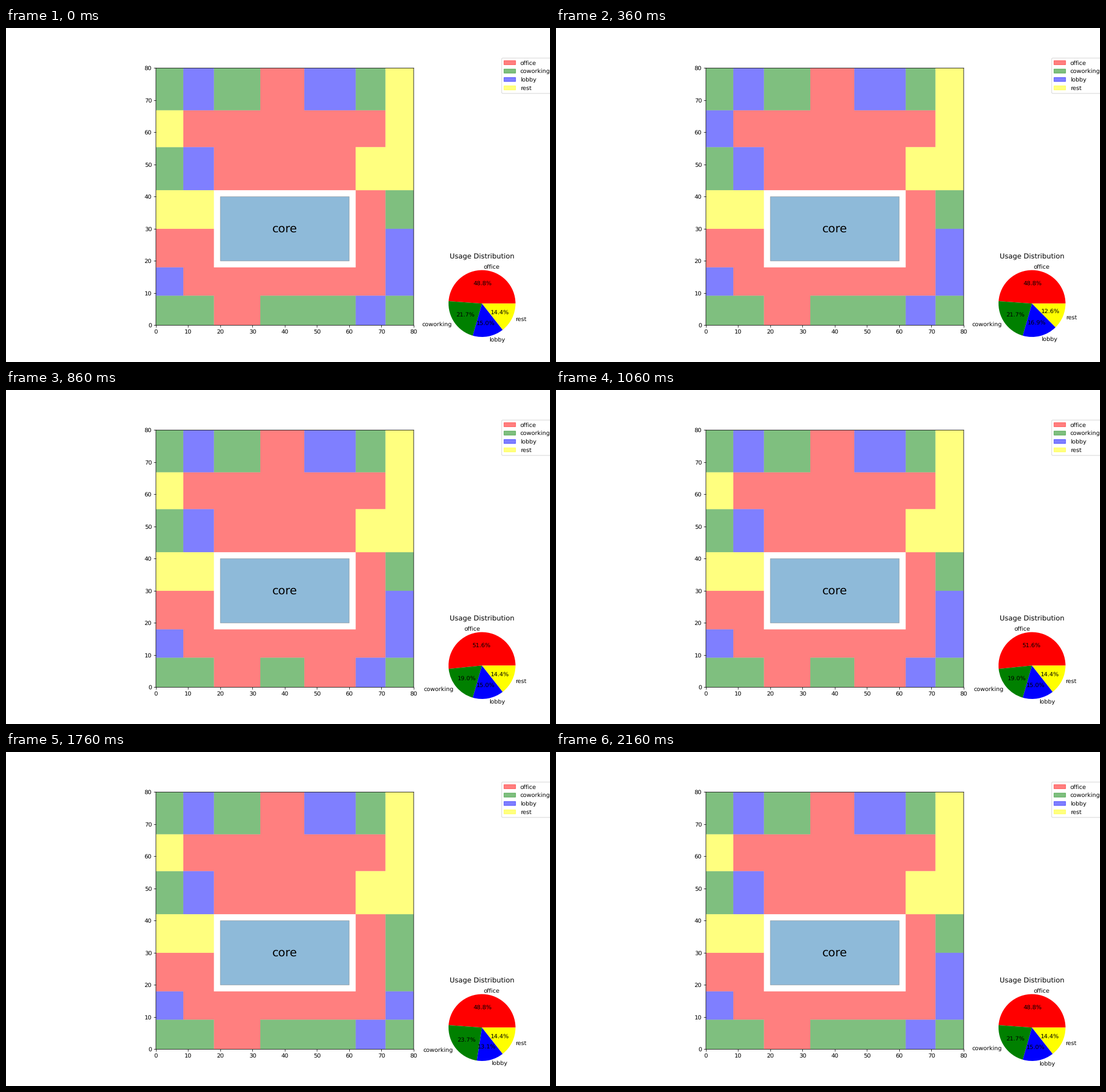
Animation, 954 px wide and 587 px high, one loop 2.26 s. Source, as a matplotlib script:

```python
import matplotlib.pyplot as plt
from matplotlib.animation import FuncAnimation
from matplotlib.patches import Patch, PathPatch, Rectangle
from matplotlib.path import Path

TICK = 20
LOOP = 2260

KINDS = {
    "O": ("office", "red"),
    "C": ("coworking", "green"),
    "L": ("lobby", "blue"),
    "R": ("rest", "yellow"),
}
XS = [0, 8.5, 18, 32.4, 46.05, 62, 71.25, 80]
YS = [80, 66.85, 55.4, 42, 30, 18, 9.2, 0]

# Floor plan from the top row down; dots are the core.
PLAN = ["CLCOLCR",
        "ROOOOOR",
        "CLOOORR",
        "RR...OC",
        "OO...OL",
        "LOOOOOL",
        "CCOCCLC"]

# Trial changes per step, each one as row, column, new kind.
STEPS = (",05O,,51C,,10L,,01C,,45L,64O,64O 30C,64O,64O 06C,"
         "64O 45C,64O,64O 65C,,25O,46C,,50C,06L,").split(",")

# Unsnapped lines and unhinted text keep soft sub-pixel edges.
plt.rcParams.update({"font.family": "DejaVu Sans", "path.snap": False,
                     "text.hinting": "none"})
fig = plt.figure(figsize=(13, 8), dpi=73.385)  # 954 x 587 px
ax = fig.add_subplot()
ax.set_aspect("equal")
ax.set_xlim(0, 80)
ax.set_ylim(0, 80)
pie_ax = fig.add_axes([0.75, 0.05, 0.25, 0.25])


def cell_path(r, c):
    x0, x1, y0, y1 = XS[c], XS[c + 1], YS[r + 1], YS[r]
    return Path([(x0, y0), (x1, y0), (x1, y1), (x0, y1), (x0, y0)],
                closed=True)


def cell_area(r, c):
    return (XS[c + 1] - XS[c]) * (YS[r] - YS[r + 1])


# One shape per kind, so that equal neighbours join without a seam.
zones = {kind: ax.add_patch(PathPatch(cell_path(0, 0), fc=color, ec="none",
                                      alpha=0.5))
         for kind, (_, color) in KINDS.items()}

ax.add_patch(Rectangle((20, 20), 40, 20, fc="tab:blue", ec="gray",
                       lw=1, alpha=0.5))
ax.text(40, 30, "core", fontsize=20, ha="center", va="center")

handles = [Patch(color=color, alpha=0.5, label=name)
           for name, color in KINDS.values()]
ax.legend(handles=handles, loc="upper left", bbox_to_anchor=(1.33, 1.05))


def layout(step):
    plan = [list(row) for row in PLAN]
    for r, c, kind in STEPS[step].split():
        plan[int(r)][int(c)] = kind
    return plan


def step_at(t):
    if t < 60:
        return int(t >= 40)
    return 2 + (t - 60) // 100


def draw_pie(areas):
    names, colors = zip(*KINDS.values())
    pie_ax.clear()
    pie_ax.pie(areas, labels=names, colors=colors, autopct="%1.1f%%")
    pie_ax.set_title("Usage Distribution")


def update(i):
    plan = layout(step_at(i * TICK))
    areas = []
    for kind, zone in zones.items():
        spots = [(r, c) for r, row in enumerate(plan)
                 for c, k in enumerate(row) if k == kind]
        zone.set_path(Path.make_compound_path(
            *(cell_path(*spot) for spot in spots)))
        areas.append(sum(cell_area(*spot) for spot in spots))
    draw_pie(areas)
    return []


anim = FuncAnimation(fig, update, frames=LOOP // TICK, interval=TICK,
                     repeat=True, repeat_delay=0)
plt.show()
```
